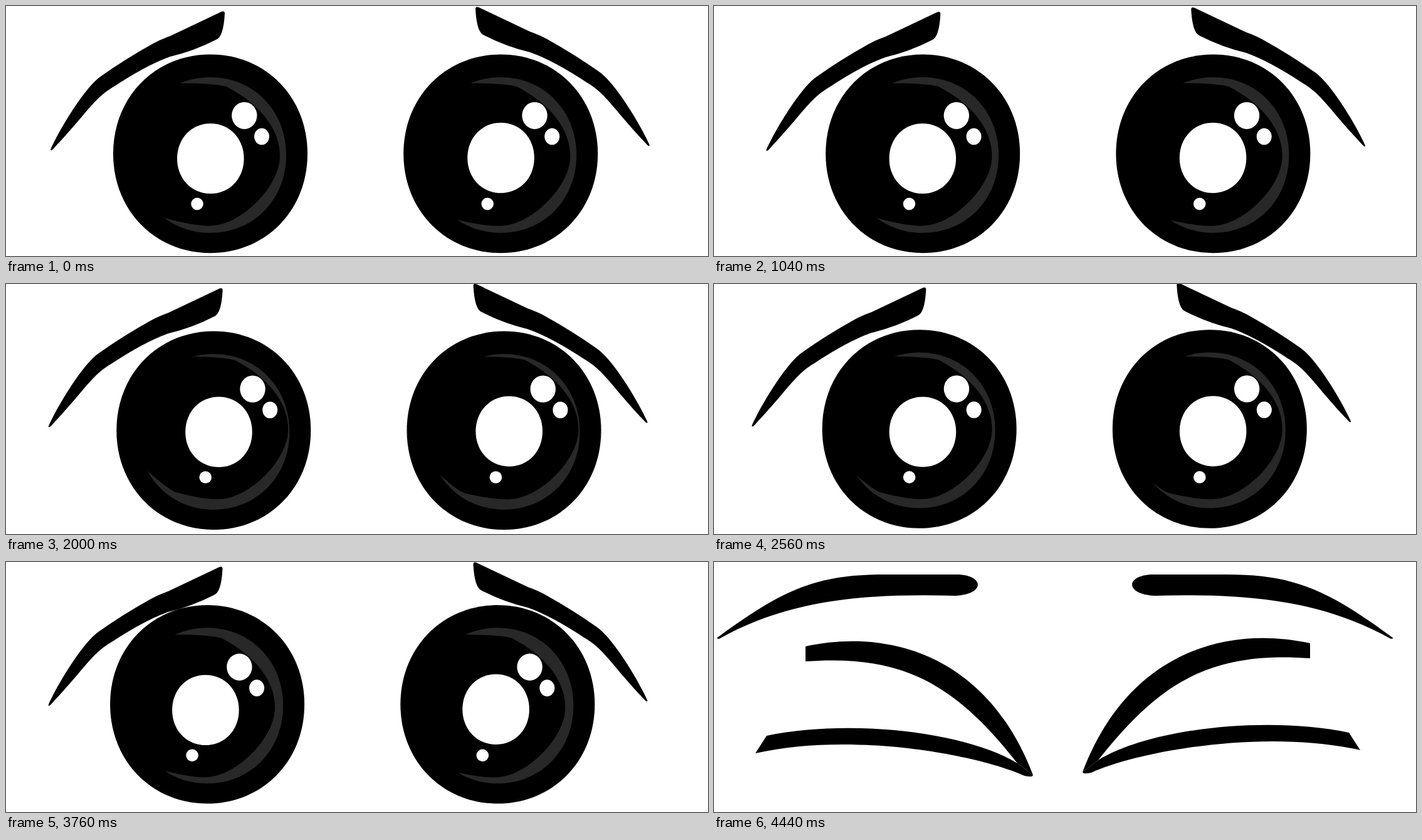
An HTML page for the animation above (4640 ms loop, 1120 by 400 pixels).

```html
<!DOCTYPE html>
<html lang="en">
<head>
<meta charset="utf-8">
<title>Eyes</title>
<style>
html, body { margin: 0; width: 100%; height: 100%; overflow: hidden; background: #fff; }
svg { display: block; width: 1120px; height: 400px; }
</style>
</head>
<body>
<svg viewBox="0 0 1120 400">
  <defs>
    <path id="brow" d="M71 230C88 192 128 128 152 112Q190 85 233 61Q245 54 262 48L344 9Q349 7 349 12Q347 50 335 54Q300 72 262 81Q225 94 172 129C140 148 132 168 77 227Q72 233 71 230Z"/>
    <path id="shutBrow" d="M4 122C110 43 165 20 270 20H390C432 22 432 52 385 54C240 50 120 60 8 123Z"/>
    <g id="shutEye">
      <path d="M146 135C290 104 440 158 509 341L484 322C383 193 300 148 146 159Z"/>
      <path d="M84 278C212 251 399 270 484 322L509 341Q508 345 495 342C420 308 220 271 66 306Z"/>
    </g>
  </defs>
  <g id="open">
    <g id="eyes"></g>
    <g class="brows">
      <use href="#brow"/>
      <use href="#brow" transform="translate(1098 -7) scale(-1 1)"/>
    </g>
  </g>
  <g id="shut">
    <use href="#shutBrow"/>
    <use href="#shutBrow" transform="translate(1088 0) scale(-1 1)"/>
    <use href="#shutEye"/>
    <use href="#shutEye" transform="translate(1097 -5) scale(-1 1)"/>
  </g>
</svg>
<script>
const SHUT_AT = 4440, LOOP = 4640, STEP = 40;

// Slightly squared oval
function oval(cx, cy, rx, ry, k = 0.57) {
  const p = (x, y) => `${cx + x * rx} ${cy + y * ry} `;
  return `M${p(0, -1)}C${p(k, -1)}${p(1, -k)}${p(1, 0)}C${p(1, k)}${p(k, 1)}${p(0, 1)}` +
         `C${p(-k, 1)}${p(-1, k)}${p(-1, 0)}C${p(-1, -k)}${p(-k, -1)}${p(0, -1)}Z`;
}

// Dark disc that leaves a crescent of the grey oval visible; sag lowers its left corner
const disc = sag => `M190 285C170 190 200 124 270 123.5Q330 123 352 129
  C410 160 437 200 437 240C437 285 385 340 340 350
  Q315 356 256 ${340 + sag}Q235 ${329 + 3 * sag} 190 285Z`;

const eye = (dx, pupilY, sag) => `<g transform="translate(${dx} 0)">
  <g class="iris">
    <path d="${oval(326, 236.4, 155, 158.8)}"/>
    <path fill="#282828" d="${oval(326, 238.5, 121, 124.5)}"/>
  </g>
  <g class="pupil">
    <path d="${disc(sag)}"/>
    <g fill="#fff">
      <path d="${oval(326.3, pupilY, 53.3, 56.2)}"/>
      <ellipse cx="380.3" cy="175.3" rx="20.2" ry="21.6"/>
      <ellipse cx="408" cy="208.8" rx="12" ry="13.3"/>
      <circle cx="305" cy="316.6" r="9.8"/>
    </g>
  </g>
</g>`;

document.getElementById("eyes").innerHTML = eye(0, 244.1, 0) + eye(463.2, 243, 2);

// Turning points of each part's drift: time, x, y. Every drift starts and ends at rest.
const home = t => ({ t, x: 0, y: 0 });
const drifts = {
  brows: [home(200), { t: 870, x: 13.8, y: 1 }, { t: 2600, x: -11, y: -3 }, home(4400)],
  iris: [home(0), { t: 1300, x: 8.4, y: 0 }, { t: 3800, x: -5, y: -8.7 }, home(4400)],
  pupil: [home(0), { t: 640, x: 7.5, y: 0 }, { t: 1480, x: 5.4, y: 0 },
          { t: 2000, x: 13.2, y: -7.3 }, { t: 3650, x: -8.8, y: -8 }, home(4400)]
};

// Halfway between linear and cosine easing
const ease = u => (u + (1 - Math.cos(Math.PI * u)) / 2) / 2;

function position(keys, t) {
  const next = keys.findIndex(key => key.t > t);
  if (next < 1) return home(t);
  const a = keys[next - 1], b = keys[next];
  const e = ease((t - a.t) / (b.t - a.t));
  return { x: a.x + (b.x - a.x) * e, y: a.y + (b.y - a.y) * e };
}

const show = (id, on) => document.getElementById(id).style.display = on ? "" : "none";

function draw(now) {
  const t = Math.floor(now % LOOP / STEP) * STEP;
  show("open", t < SHUT_AT);
  show("shut", t >= SHUT_AT);
  for (const name in drifts) {
    const { x, y } = position(drifts[name], t);
    for (const part of document.getElementsByClassName(name)) {
      part.setAttribute("transform", `translate(${x} ${y})`);
    }
  }
}

const start = performance.now();
function tick() {
  draw(performance.now() - start);
  requestAnimationFrame(tick);
}
tick();
</script>
</body>
</html>
```
